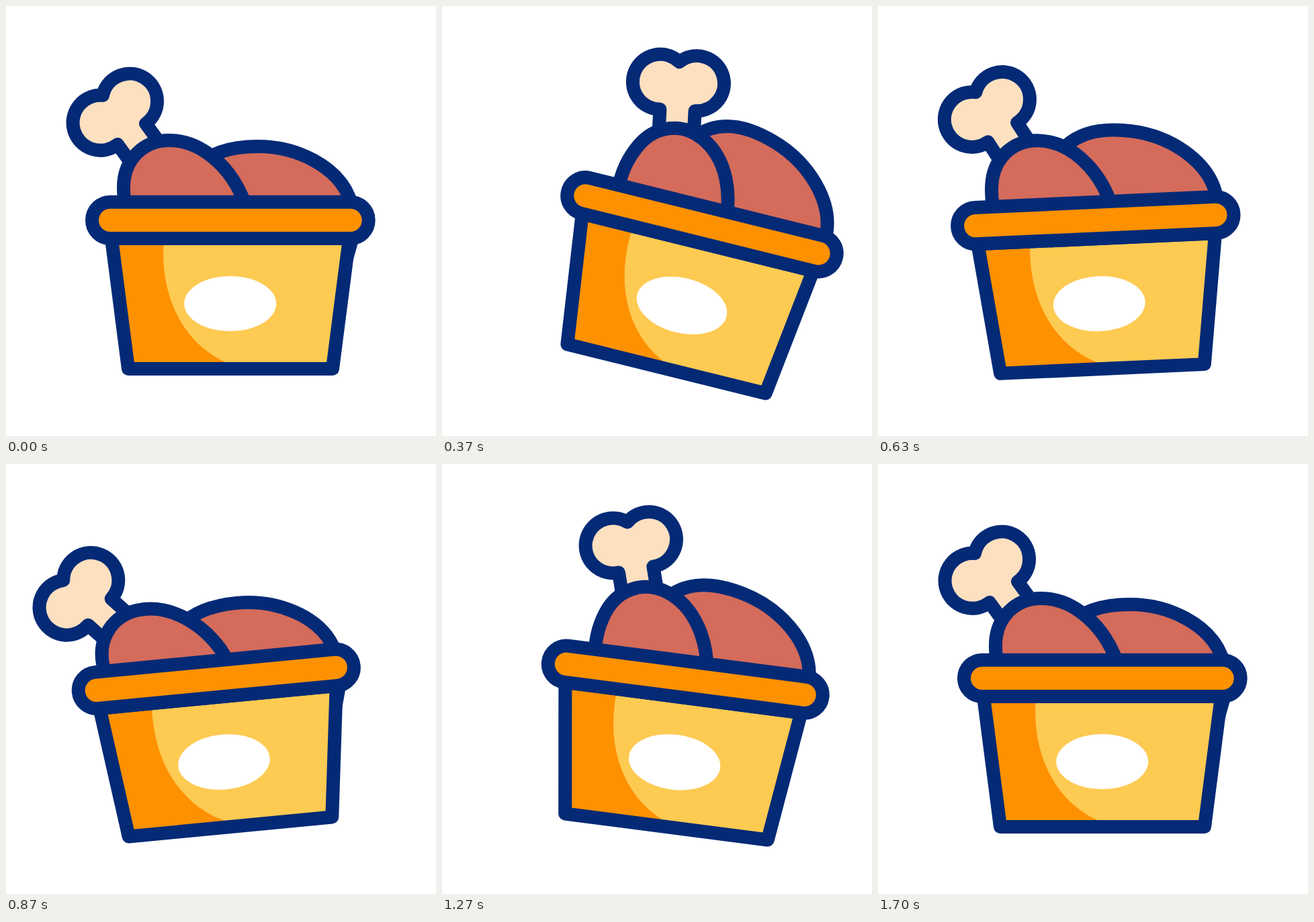
An HTML page that plays this animation: 640 px wide and 640 px high, repeating every 2000 ms.

```html
<!DOCTYPE html>
<html lang="en">
<head>
<meta charset="utf-8">
<title>Chicken bucket</title>
<style>
  html, body { margin: 0; width: 100%; height: 100%; overflow: hidden; background: #fff; }
  svg { display: block; width: 100vw; height: 100vh; }
  .line { stroke: #042a76; stroke-width: 20; stroke-linejoin: round; stroke-linecap: round; }
  .meat { fill: #d46b5b; }
  .bone { fill: #fde0c0; }
  .orange { fill: #fe9100; }
  .yellow { fill: #fdca52; }
</style>
</head>
<body>
<svg viewBox="0 0 640 640">
  <g id="bucket">
    <path id="wing" class="line meat" d="M290 400L264 310C258 262 282 209 375 209C435 209 492 240 510 283Q520 305 520 330L500 400Z"/>
    <g id="leg">
      <path class="line bone" d="M195 246L166 206A41 41 0 1 1 144 133A41 41 0 1 1 208 175L237 215"/>
      <path class="line meat" d="M196 345C178 312 175 290 175 270C175 229 204 200 243 200C290 200 332 238 352 285L368 332Z"/>
    </g>
    <path class="yellow" d="M157 346H511L486 540H182Z"/>
    <path class="orange" d="M157 346H235C228 430 262 500 326 530L346 540H182Z"/>
    <path class="line" fill="none" d="M157 346H511L486 540H182Z"/>
    <rect class="line orange" x="128" y="291.7" width="411.7" height="54.3" rx="27"/>
    <ellipse cx="333.7" cy="443" rx="68.5" ry="41" fill="#fff"/>
  </g>
</svg>
<script>
  const LOOP = 2000, FPS = 30, LAST = 51;

  const ease = u => u * u * (3 - 2 * u);

  // Rock from rest through three swings (degrees) and back to rest:
  // the first turn comes at `first` ms, the others every `gap` ms.
  function rock(id, pivot, first, gap, swings) {
    const el = document.getElementById(id);
    const stops = [0, ...swings, 0];
    return ms => {
      const pos = ms < first ? ms / first : 1 + (ms - first) / gap;
      const i = Math.min(Math.floor(pos), stops.length - 2);
      const u = ease(Math.min(pos - i, 1));
      const angle = stops[i] + (stops[i + 1] - stops[i]) * u;
      el.setAttribute("transform", `rotate(${angle} ${pivot})`);
    };
  }

  // The leg and the wing trail behind the bucket.
  const parts = [
    rock("bucket", "334 540", 365, 400, [13.9, -8.2, 8.8]),
    rock("leg", "285.5 334.5", 425, 375, [26.5, -9.4, 22.6]),
    rock("wing", "505 306", 445, 385, [19.2, -0.5, 14.4])
  ];

  const start = performance.now();

  function draw() {
    const ms = (performance.now() - start) % LOOP;
    const step = Math.min(LAST, Math.floor((ms + 4) * FPS / 1000));
    parts.forEach(pose => pose(step * 1000 / FPS));
    requestAnimationFrame(draw);
  }
  draw();
</script>
</body>
</html>
```
